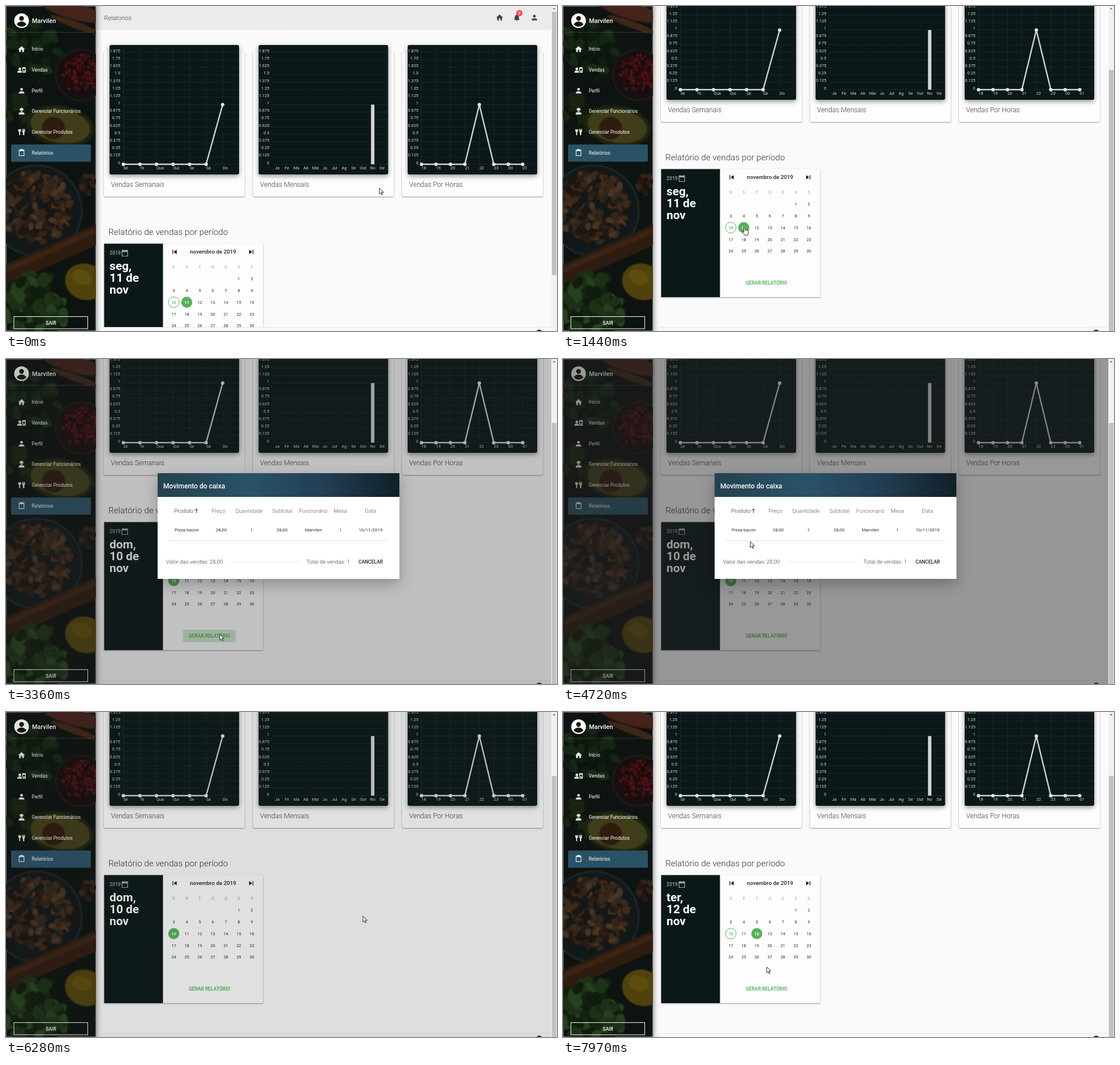
An HTML page that plays this animation: 974x575 px, repeating every 8 s.

```html
<!DOCTYPE html>
<html lang="pt">
<head>
<meta charset="utf-8">
<title>Relatorios</title>
<style>
html, body { margin: 0; width: 100%; height: 100%; overflow: hidden; background: #fafafa; }
svg { display: block; width: 100vw; height: 100vh; font-family: Roboto, sans-serif; }
.card { fill: #fdfdfd; filter: drop-shadow(0 1px 1px rgba(0,0,0,.4)); }
.plot { fill: #0b1819; filter: drop-shadow(0 3px 4px rgba(0,0,0,.42)); }
.grid { stroke: #fff; stroke-opacity: .17; stroke-width: .7; stroke-dasharray: 1.3; }
#modal { filter: drop-shadow(0 9px 12px rgba(0,0,0,.26)); }
#photo { filter: blur(1.3px); }
</style>
</head>
<body>
<svg id="stage" viewBox="0 0 974 575"></svg>
<script>
const LOOP = 8000, SCROLL = 132, USER = 'Marvilen';
const DARK = '#0b1819', GREEN = '#55b359', INK = '#2b2b2b';

const icons = {
  home: 'M10 20v-6h4v6h5v-8h3L12 3 2 12h3v8z',
  sales: 'M0 20v-2c0-3 4-4 7-4s5 .8 6 2v4zM7 5a4 4 0 1 0 .01 0zM14 4h10v16h-9v-5l-1-2zM19 8a3 3 0 1 0 .01 0zM16 17h6v-1h-6z',
  person: 'M12 4a4 4 0 1 0 .01 0zM4 20v-2c0-2.7 5.3-4 8-4s8 1.3 8 4v2z',
  worker: 'M12 2c-3 0-5 2-5 4H6v2h12V6h-1c0-2-2-4-5-4zM8 9a4 4 0 0 0 8 0zM4 21v-3c0-2.7 5-4 8-4s8 1.3 8 4v3z',
  food: 'M2 4h9l-1 6-2 2v9H5v-9l-2-2zM14 3h2v5h1V3h2v5h1V3h2v7l-2 3v8h-4v-8l-2-3z',
  board: 'M4 3h4V1h8v2h4v18H4zM6 7v12h12V7z',
  bell: 'M12 22a2 2 0 0 0 2-2h-4a2 2 0 0 0 2 2zM18 16v-5c0-3-1.6-5.6-4.5-6.3V4a1.5 1.5 0 0 0-3 0v.7C7.6 5.4 6 7.9 6 11v5l-2 2v1h16v-1z',
  date: 'M3 4h3V2h2v2h8V2h2v2h3v18H3zM5 9v11h14V9z',
  prev: 'M6 6h2v12H6zM9.5 12l8.5 6V6z',
  next: 'M6 18l8.5-6L6 6zM16 6h2v12h-2z'
};

// y is the middle of the capital letters
const text = (x, y, s, size, fill = '#fff', weight = 400, anchor = 'start') =>
  `<text x="${x}" y="${y + size * .355}" font-size="${size}" fill="${fill}" font-weight="${weight}" text-anchor="${anchor}">${s}</text>`;
const mid = (x, y, s, size, fill, weight) => text(x, y, s, size, fill, weight, 'middle');
const rect = (x, y, w, h, fill, more = '') =>
  `<rect x="${x}" y="${y}" width="${w}" height="${h}" fill="${fill}" ${more}/>`;
const box = (x, y, w, h, name, r) =>
  `<rect class="${name}" x="${x}" y="${y}" width="${w}" height="${h}" rx="${r}"/>`;
const disc = (x, y, r, fill, more = '') => `<circle cx="${x}" cy="${y}" r="${r}" fill="${fill}" ${more}/>`;
const oval = (x, y, rx, ry, fill, turn = 0) =>
  `<ellipse rx="${rx}" ry="${ry}" fill="${fill}" transform="translate(${x} ${y}) rotate(${turn})"/>`;
const line = (x1, y1, x2, y2, more) => `<path d="M${x1} ${y1}L${x2} ${y2}" ${more}/>`;
const icon = (name, x, y, fill, k = .611) =>
  `<path d="${icons[name]}" fill="${fill}" fill-rule="evenodd" transform="translate(${x} ${y}) scale(${k}) translate(-12 -12)"/>`;

let seed = 7;
const rand = () => (seed = (seed * 16807) % 2147483647) / 2147483647;
const scatter = (n, cx, cy, radius, size, colors) => Array.from({ length: n }, () => {
  const a = rand() * 6.283, d = Math.sqrt(rand()) * radius;
  return oval(cx + d * Math.cos(a), cy + d * Math.sin(a), size, size * .65, colors[Math.floor(rand() * colors.length)], rand() * 180);
}).join('');

function photo() {
  return `<g id="photo">` + rect(0, 0, 159, 575, '#0d1310') +
    oval(118, 8, 60, 15, '#43231a', 16) + oval(122, 33, 46, 6, '#3f2718', 20) +
    scatter(45, 42, 82, 52, 11, ['#0f1d10', '#152614', '#0d180d', '#1a2c18']) +
    disc(133, 122, 45, '#15100f', 'stroke="#261d1a" stroke-width="2"') +
    scatter(200, 133, 120, 34, 3, ['#4b1014', '#330b0e', '#5e161a', '#1f090a']) +
    scatter(16, 30, 185, 32, 11, ['#10190e', '#192410']) +
    oval(96, 212, 60, 36, '#1c230e', 10) + oval(96, 212, 53, 30, '#403e1a', 10) + disc(84, 216, 20, '#2e1c0e') +
    disc(54, 362, 80, '#11181a', 'stroke="#243034" stroke-width="2"') +
    scatter(190, 54, 356, 64, 7.5, ['#3d2a1b', '#4a3523', '#2a1d13', '#1c1510', '#33251a']) +
    scatter(16, 146, 315, 16, 7, ['#33241a', '#221811']) +
    line(-10, 480, 170, 400, 'stroke="#2e1c0f" stroke-width="34"') +
    line(-10, 472, 170, 392, 'stroke="#3a2414" stroke-width="9"') +
    oval(140, 488, 36, 32, '#50420c', 20) + oval(134, 480, 18, 13, '#5e4d0f', 20) +
    scatter(110, 52, 530, 56, 12, ['#14230f', '#1c3116', '#26401f', '#101c0d']) + '</g>';
}

function sidebar() {
  const items = [['home', 'Início'], ['sales', 'Vendas'], ['person', 'Perfil'], ['worker', 'Gerenciar Funcionários'],
    ['food', 'Gerenciar Produtos'], ['board', 'Relatórios']];
  return rect(159, 0, 11, 575, 'url(#edge)') + `<g clip-path="url(#side)">${photo()}</g>` +
    disc(27.5, 26, 13, '#fff') + disc(27.5, 22, 4.2, '#1a1512') +
    '<path d="M19 32.5c2-4 6-5 8.5-5s6.5 1 8.5 5c-2 2.8-5 4-8.5 4s-6.5-1.2-8.5-4z" fill="#1a1512"/>' +
    text(46, 26, USER, 10.9, '#fff', 500) + rect(9, 46, 141, .8, 'rgba(255,255,255,.2)') +
    rect(9, 245, 141, 30.5, '#2a5266', 'rx="2"') +
    items.map(([name, label], i) => icon(name, 27.5, 76.5 + 36.65 * i, '#e8e8e8') + text(45.5, 76.5 + 36.65 * i, label, 8.45)).join('') +
    rect(14, 549.5, 130.5, 21.5, 'none', 'stroke="#fff"') + mid(79.5, 560.5, 'SAIR', 8.5, '#fff', 500);
}

function chart(x, title, labels, step, peak, bars) {
  const x0 = x + 34.5, zero = 280, unit = 105.5, right = x + 239;
  let s = box(x, 81, 249, 256, 'card', 2) + box(x + 10, 69, 229, 229, 'plot', 3);
  for (let i = 0; i < 16; i++) {
    const y = zero - unit * i / 8;
    s += line(x0, y, right, y, 'class="grid"') + text(x + 29, y - 3, i / 8, 7.35, '#d3d7d6', 400, 'end');
  }
  const top = i => i == peak ? zero - unit : zero;
  labels.forEach((label, i) => {
    const lx = x0 + step * i;
    s += bars ? mid(x + 43 + step * i, 286, label, 7.35, '#d3d7d6')
      : line(lx, 74, lx, zero, 'class="grid"') + text(lx, 286, label, 7.35, '#d3d7d6');
  });
  if (bars) s += rect(x + 40 + step * peak, top(peak), 6, unit, '#d3d6d2');
  else {
    const pts = labels.map((_, i) => [x0 + step * i, top(i)]);
    s += `<polyline points="${pts}" fill="none" stroke="#d3d6d2" stroke-width="2.4"/>` +
      pts.map(p => disc(p[0], p[1], 3.1, '#e2e4e2')).join('');
  }
  return s + text(x + 12.5, 316, title, 12.05, '#3c3c3c', 300);
}

function page() {
  const week = ['Se', 'Te', 'Qua', 'Qui', 'Se', 'Sá', 'Do'];
  const months = 'Ja Fe Ma Ab Mai Ju Jul Ag Se Out No De'.split(' ');
  const hours = '18 19 20 21 22 23 00 01'.split(' ');
  return rect(159, 0, 805, 42, '#ebebeb') + text(173.5, 21, 'Relatorios', 11, '#444', 300) +
    icon('home', 872.5, 20.5, '#37474f') + icon('bell', 903, 20.5, '#37474f') + icon('person', 934, 20.5, '#37474f') +
    disc(907.5, 12.5, 5.5, '#f4514a') + mid(907.5, 12.5, '0', 6.5, '#fff') +
    chart(173, 'Vendas Semanais', week, 29.25, 6) +
    chart(436.5, 'Vendas Mensais', months, 16.87, 10, true) +
    chart(700, 'Vendas Por Horas', hours, 25.55, 4) +
    text(181, 400, 'Relatório de vendas por período', 15.25, '#333', 300) +
    box(173.5, 420.5, 281, 226.5, 'card', 1) + rect(173.5, 420.5, 104, 226.5, DARK) +
    text(183, 437, '2019', 8.7, '#a3a9a9', 500) + icon('date', 210, 437, '#a3a9a9') +
    icon('prev', 298, 435, '#111') + icon('next', 433.5, 435, '#111') +
    mid(366, 435, 'novembro de 2019', 9.8, '#222', 500) +
    [...'DSTQQSS'].map((d, i) => mid(296.5 + 23 * i, 461.5, d, 7.3, '#9c9c9c')).join('') +
    '<g id="days"></g>' + rect(313, 611, 93, 22, '#cdeacf', 'id="hover" rx="1.5"') +
    mid(359.7, 621.5, 'GERAR RELATÓRIO', 8.5, '#43ad49', 500);
}

function days(selected, weekday) {
  let s = [weekday + ',', selected + ' de', 'nov'].map((w, i) => text(183, 460 + 20.7 * i, w, 20.8, '#fff', 700)).join('');
  for (let d = 1; d <= 30; d++) {
    const x = 296.6 + 23 * ((d + 4) % 7), y = 482.5 + 20.8 * Math.floor((d + 4) / 7);
    const on = d == selected, today = d == 10;
    if (on) s += disc(x, y, 9.8, GREEN);
    else if (today) s += disc(x, y, 9.4, 'none', `stroke="${GREEN}"`);
    s += mid(x, y, d, 7.4, on ? '#fff' : today ? GREEN : INK, on ? 700 : today ? 500 : 400);
  }
  return s;
}

function modal() {
  const cols = [['Preço', 375.5, '28,00', 380.5], ['Quantidade', 429.5, 1, 434], ['Subtotal', 488.5, '28,00', 488],
    ['Funcionário', 543.5, USER, 543.5], ['Mesa', 591, 1, 591], ['Data', 644.5, '10/11/2019', 644.5]];
  return rect(268, 202, 427.5, 187, '#fff') + rect(268, 202, 427.5, 42, 'url(#head)') +
    text(278, 225, 'Movimento do caixa', 12.1, '#fff', 500) +
    text(297.5, 268.5, 'Produto', 9.7, '#222', 300) +
    '<path d="M336.5 272.5v-7.500m-3 3l3-3 3 3" fill="none" stroke="#333"/>' + mid(319.5, 302, 'Pizza bacon', 7.95, INK) +
    cols.map(([head, hx, cell, cx]) => mid(hx, 268.5, head, 9.7, '#555', 300) + mid(cx, 302, cell, 7.95, INK)).join('') +
    rect(288, 321, 388, .8, '#dcdcdc') + rect(396, 358.6, 122, .8, '#e2e2e2') +
    text(283, 359, 'Valor das vendas: 28,00', 9.7, '#333', 300) + text(531, 359, 'Total de vendas: 1', 9.7, '#333', 300) +
    `<g id="press" clip-path="url(#cancel)">${rect(613, 348, 63, 22.5, '#e2e2e2')}${disc(643.5, 359, 0, '#a9a9a9', 'id="ripple"')}</g>` +
    mid(644.5, 359, 'CANCELAR', 8.5, '#222', 500);
}

const $ = id => document.getElementById(id);
$('stage').innerHTML = `<defs>
  <linearGradient id="edge"><stop stop-opacity=".27"/><stop offset=".5" stop-opacity=".08"/><stop offset="1" stop-opacity="0"/></linearGradient>
  <linearGradient id="head"><stop stop-color="#23424f"/><stop offset=".38" stop-color="#2a5267"/>
    <stop offset=".7" stop-color="#223d52"/><stop offset="1" stop-color="#0f2027"/></linearGradient>
  <clipPath id="side"><rect width="159" height="575"/></clipPath>
  <clipPath id="cancel"><rect x="613" y="348" width="63" height="22.5"/></clipPath></defs>` +
  rect(0, 0, 974, 575, '#fafafa') + `<g id="page">${page()}</g>` +
  rect(169, 568, 795, 7, '#f7f7f7') + rect(169, 568, 795, .7, '#e3e3e3') + disc(942.5, 579, 6.5, '#333') + sidebar() +
  rect(964, 0, 10, 575, '#f1f1f1') + '<path d="M966.5 6l2.5-3 2.5 3z" fill="#777"/>' +
  rect(965, 10, 8, 466, '#c1c1c1', 'id="thumb"') +
  rect(0, 0, 964, 575, '#212121', 'id="shade"') + `<g id="modal">${modal()}</g>` +
  `<g id="cursor" stroke="#111" stroke-width=".9" fill="#fff" stroke-linejoin="round">
    <path id="arrow" d="M0 0v10.5l2.5-2.3 1.7 3.9 1.6-.7-1.7-3.8h3.3z"/>
    <path id="hand" d="M-1.2 1c0-1.4 2.2-1.4 2.2 0v4l4.6 1.2c1 .3 1.3 1 1.2 2l-.7 3.8-.7 2.5h-5.2l-3.4-5c-.8-1.3.6-2 1.4-1.2l.6.8z"/></g>`;

const clamp = v => Math.min(1, Math.max(0, v));
const span = (t, a, b) => clamp((t - a) / (b - a));
const smooth = u => u * u * (3 - 2 * u);
const out = u => 1 - (1 - u) ** 3;

// time, x, y of the pointer tip
const path = [[0, 660, 322], [380, 660, 322], [820, 546, 369], [1400, 321, 391], [1480, 321, 391], [1620, 301, 391],
  [1760, 301, 391], [2480, 381, 474], [2690, 378, 487], [3680, 378, 487], [4480, 331, 342], [4620, 327, 326], [4720, 331, 323],
  [4800, 332, 320], [5300, 555, 321], [5600, 652, 354], [5760, 642, 361], [6100, 642, 361], [6220, 631, 361], [6320, 631, 361],
  [6700, 406, 370], [7080, 335, 384], [7400, 335, 384], [7950, 360, 451]];
function pointer(t) {
  const i = path.findIndex(k => k[0] > t);
  if (i < 0) return path[path.length - 1].slice(1);
  const [a, b] = [path[i - 1], path[i]], u = smooth(span(t, a[0], b[0]));
  return [a[1] + (b[1] - a[1]) * u, a[2] + (b[2] - a[2]) * u];
}

const show = (id, on) => $(id).style.display = on ? '' : 'none';
let picked;
function draw(t) {
  const scroll = smooth(span(t, 30, 450));
  $('page').setAttribute('transform', `translate(0 ${-SCROLL * scroll})`);
  $('thumb').setAttribute('y', 10 + 103 * scroll);

  const pick = t < 1690 ? [11, 'seg'] : t < 7340 ? [10, 'dom'] : [12, 'ter'];
  if (picked !== pick[0]) $('days').innerHTML = days(...pick);
  picked = pick[0];

  const open = out(span(t, 3020, 3320)) * (1 - out(span(t, 6060, 6260))), k = .5 + open / 2;
  $('modal').setAttribute('transform', `translate(482 295.5) scale(${k}) translate(-482 -295.5)`);
  $('modal').setAttribute('opacity', open);
  show('modal', open > 0);
  $('shade').setAttribute('opacity', .46 * smooth(span(t, 3180, 3500)) * (1 - span(t, 6140, 6440)) ** 2);
  show('hover', t >= 2850 && t < 3400);
  show('press', t >= 5900);
  $('ripple').setAttribute('r', 34 * span(t, 5955, 6045));

  const [x, y] = pointer(t);
  const inside = (l, top, r, b) => x >= l && x <= r && y >= top && y <= b;
  const hand = t > 3020 && t < 6100 ? t > 3600 && inside(613, 348, 676, 371)
    : scroll == 1 && (inside(286, 341, 446, 443) || inside(313, 478, 406, 501));
  $('cursor').setAttribute('transform', `translate(${x} ${y})`);
  show('arrow', !hand);
  show('hand', hand);
}

function tick() {
  draw(performance.now() % LOOP);
  requestAnimationFrame(tick);
}
tick();
</script>
</body>
</html>
```
